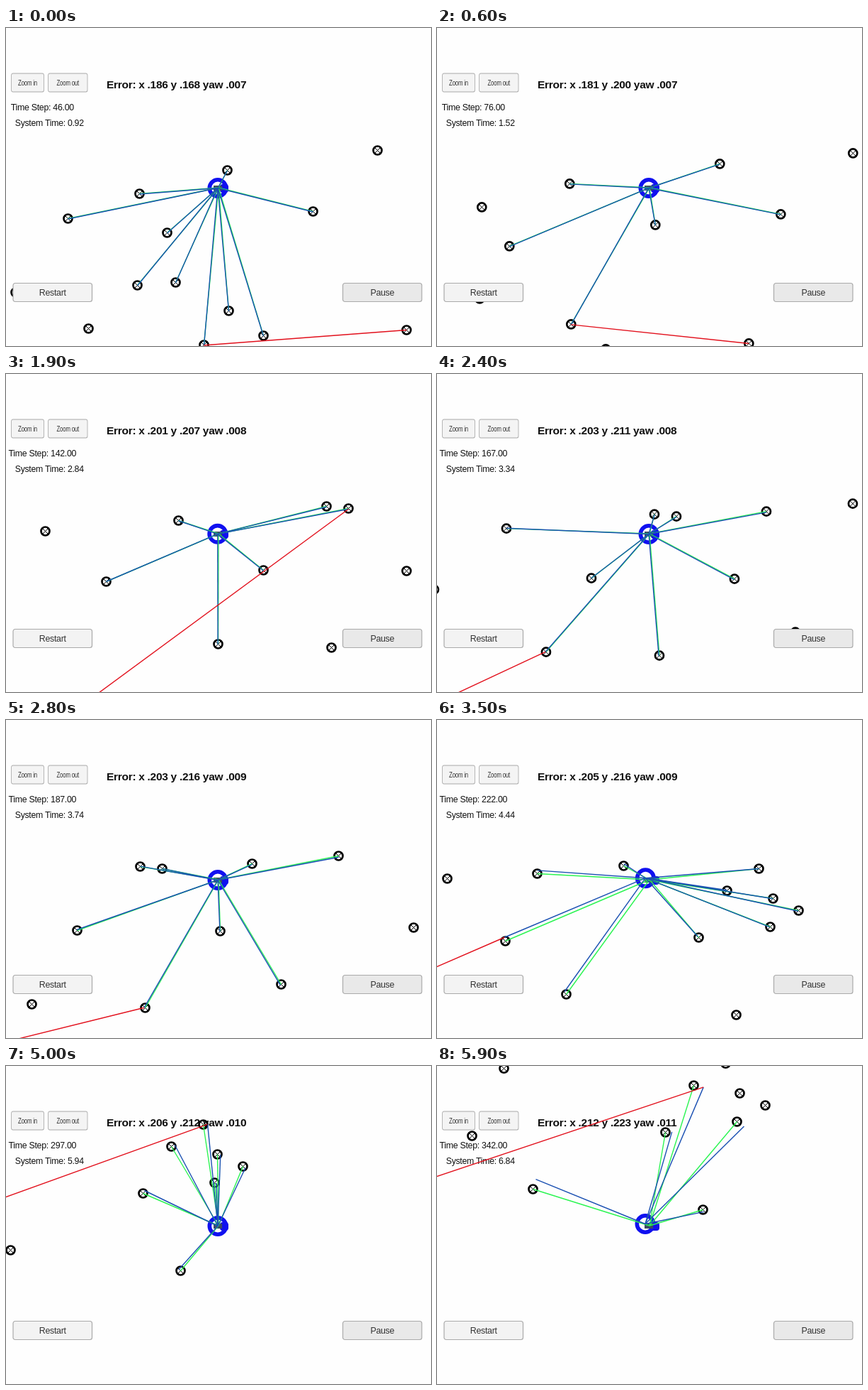
Animation of 600 by 448 pixels, one loop 6000 ms. Source, as an HTML page with a canvas:

```html
<!DOCTYPE html>
<html lang="en">
<head>
<meta charset="utf-8">
<title>Landmark tracking</title>
<style>
  html, body { margin: 0; width: 100%; height: 100%; overflow: hidden; background: #fefefe; }
  canvas { display: block; }
</style>
</head>
<body>
<canvas id="stage" width="600" height="448"></canvas>
<script>
const ctx = document.getElementById('stage').getContext('2d');
const FONT = '"Liberation Sans", Arial, sans-serif';
const LOOP = 6000, TICK = 100, TICKS = LOOP / TICK;
const CAR = [300, 225], SIGHT = 225.8, MATCH_SIGHT = 227;
const ANCHOR = [565, 425];

// the map, in world coordinates
const landmarks = [
  [312, 200], [188, 233], [87, 268], [227, 288], [185, 362], [239, 358], [314, 398],
  [279, 446], [363, 433], [433, 258], [524, 172], ANCHOR, [116, 423], [13, 372],
  [610, 243], [712, 157], [832, 227], [768, 331], [928, 336], [921, 137], [952, 140],
  [1034, 228], [1079, 133], [1201, 122], [1120, 303], [1307, 223], [1347, 157],
  [1392, 126], [1412, 168], [1448, 185], [1408, 208], [1360, 332]
];

// the drive: tick, world shift x and y, error x and y in thousandths
const drive = [
  [0, 0, 0, 186, 168], [13, -298, 37, 187, 214], [19, -469, 49, 201, 207],
  [28, -732, 69, 203, 216], [35, -938, 83, 205, 216], [42, -1071, 71, 206, 215],
  [50, -1114, -44, 206, 212], [59, -985, -130, 212, 223]
];

const slope = (i, c) => (drive[i + 1][c] - drive[i][c]) / (drive[i + 1][0] - drive[i][0]);

function tangent(i, c) {
  const last = drive.length - 1;
  if (i === 0) return 2 * slope(0, c) - tangent(1, c);
  if (i === last) return slope(last - 1, c);
  const before = drive[i][0] - drive[i - 1][0], after = drive[i + 1][0] - drive[i][0];
  return (slope(i - 1, c) * after + slope(i, c) * before) / (before + after);
}

// smooth curve through column c of the drive
function along(tick, c) {
  let i = 0;
  while (i < drive.length - 2 && tick >= drive[i + 1][0]) i++;
  const span = drive[i + 1][0] - drive[i][0];
  const u = (tick - drive[i][0]) / span, w = 1 - u;
  return drive[i][c] * (1 + 2 * u) * w * w + drive[i + 1][c] * u * u * (3 - 2 * u)
    + span * u * w * (tangent(i, c) * w - tangent(i + 1, c) * u);
}

function line(a, b, color, width = 1.4) {
  ctx.strokeStyle = color;
  ctx.lineWidth = width;
  ctx.beginPath();
  ctx.moveTo(...a);
  ctx.lineTo(...b);
  ctx.stroke();
}

function ring([x, y], radius, color, width) {
  ctx.strokeStyle = color;
  ctx.lineWidth = width;
  ctx.beginPath();
  ctx.arc(x, y, radius, 0, 7);
  ctx.stroke();
}

function text(label, x, y, size, { align = 'center', weight = '', color = '#111' } = {}) {
  ctx.font = `${weight} ${size}px ${FONT}`;
  ctx.letterSpacing = '-0.3px';
  ctx.textAlign = align;
  ctx.fillStyle = color;
  ctx.fillText(label, x, y);
}

function button(label, x, y, width, fill, squeeze = 1, size = 12.4) {
  ctx.save();
  ctx.translate(x, y);
  ctx.scale(squeeze, 1);
  ctx.beginPath();
  ctx.roundRect(0, 0, width / squeeze, 26, 3);
  ctx.fillStyle = fill;
  ctx.fill();
  ctx.strokeStyle = '#aaa';
  ctx.lineWidth = 1.2;
  ctx.stroke();
  text(label, width / squeeze / 2, 17.4, size, { color: '#333' });
  ctx.restore();
}

function drawLandmark([x, y]) {
  ring([x, y], 6, '#000', 2.7);
  line([x - 3.7, y - 3.7], [x + 3.7, y + 3.7], '#000', 1);
  line([x - 3.7, y + 3.7], [x + 3.7, y - 3.7], '#000', 1);
}

function drawCar(guess) {
  ctx.fillStyle = '#1212e6';
  ctx.beginPath();
  ctx.roundRect(CAR[0] + 2, CAR[1] - 5, 12, 12, 4);
  ctx.fill();
  ring(guess, 11.7, '#1010f0', 5.6);
  ctx.fillStyle = '#3b4a66';
  ctx.fillRect(CAR[0] - 7, CAR[1] - 3, 12, 7);
}

function drawPanel(tick) {
  const step = 46 + 5 * tick + (tick >= 17 ? 1 : 0);
  const decimals = v => v.toFixed(3).slice(1);
  const [x, y] = [3, 4].map(c => decimals(along(tick, c) / 1000));
  const yaw = decimals(.007 + .0000594 * tick);
  text(`Error: x ${x} y ${y} yaw ${yaw}`, 142, 84.7, 15.5, { align: 'left', weight: 'bold' });
  text(`Time Step: ${step.toFixed(2)}`, 51.3, 116.2, 12.4);
  text(`System Time: ${(step * .02).toFixed(2)}`, 61.2, 138.3, 12.3);
}

function draw(tick) {
  // the estimate lurches now and then, and its heading drifts away
  const lurch = Math.cos(Math.PI * (tick - 13) / 23) ** 8;
  const drift = .07 * (tick / (TICKS - 1)) ** 3;
  const guess = [299 - 5 * lurch, 225.5 - 3 * lurch];

  const shiftX = along(tick, 1) + .5, shiftY = along(tick, 2) + .5;
  const place = ([x, y]) => [x + shiftX, y + shiftY];
  const range = (a, b) => Math.hypot(a[0] - b[0], a[1] - b[1]);
  const believed = ([x, y]) => {
    const dx = x - CAR[0], dy = y - CAR[1], c = Math.cos(drift), s = Math.sin(drift);
    return [CAR[0] + dx * c - dy * s, guess[1] + dx * s + dy * c];
  };

  ctx.fillStyle = '#fefefe';
  ctx.fillRect(0, 0, 600, 448);
  drawPanel(tick);

  const points = landmarks.map(place);
  const seen = points.filter(p => range(p, CAR) < SIGHT);
  const matched = seen.filter(p => range(p, guess) < MATCH_SIGHT);
  points.forEach(drawLandmark);
  drawCar(guess);
  seen.forEach(p => line(CAR, p, '#2bf552'));
  matched.forEach(p => line(guess, believed(p), '#1a50b2'));

  // the farthest matched landmark is tied to the anchor
  const reach = p => Math.hypot(p[0] - CAR[0], 1.05 * (p[1] - CAR[1]));
  const far = matched.reduce((a, b) => reach(b) > reach(a) ? b : a);
  line(place(ANCHOR), believed(far), '#e2101c');

  button('Zoom in', 7.5, 64, 46, '#f4f4f4', .7, 11.2);
  button('Zoom out', 59.5, 64, 55.5, '#f4f4f4', .7, 11.2);
  button('Restart', 10, 359.5, 111.5, '#f3f3f3');
  button('Pause', 475.5, 359.5, 111.5, '#e9e9e9');
}

function loop() {
  draw(Math.floor(performance.now() % LOOP / TICK));
  requestAnimationFrame(loop);
}
loop();
</script>
</body>
</html>
```
